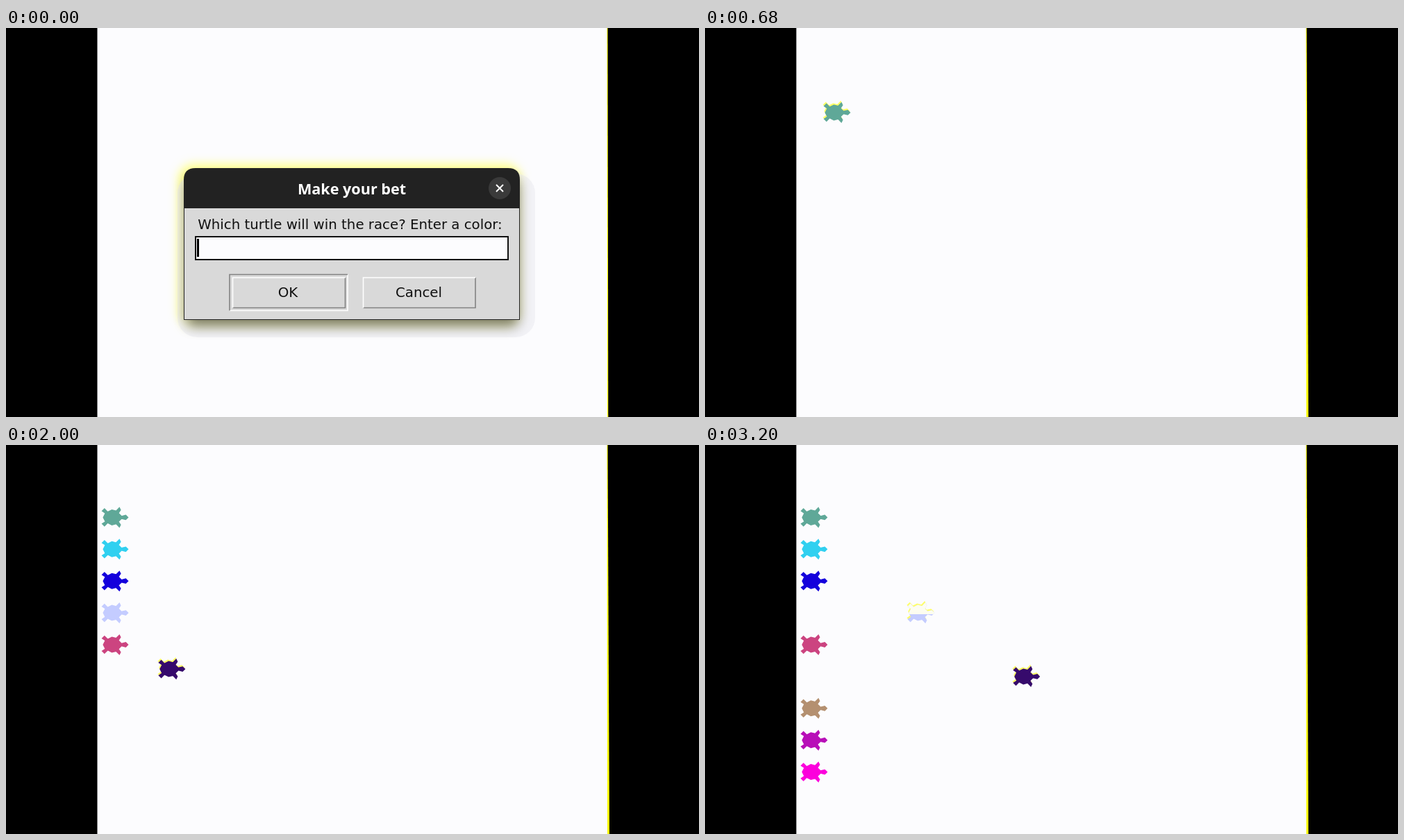
An HTML page that plays this animation: 998x561 px, repeating every 3360 ms.

```html
<!DOCTYPE html>
<html lang="en">
<head>
<meta charset="utf-8">
<title>Turtle race</title>
<style>
  html, body { margin: 0; width: 100%; height: 100%; overflow: hidden; background: #000; }
  svg { display: block; width: 998px; height: 561px; }
  text { font: 19.8px "DejaVu Sans", sans-serif; text-anchor: middle; fill: #111; }
  .title { font: bold 21.6px "Noto Sans", "Open Sans", sans-serif; fill: #fff; }
</style>
</head>
<body>
<svg id="stage" viewBox="0 0 998 561">
  <defs>
    <filter id="soft" x="-20%" y="-20%" width="140%" height="140%"><feGaussianBlur stdDeviation="7"/></filter>
    <filter id="softer" x="-20%" y="-20%" width="140%" height="140%"><feGaussianBlur stdDeviation="9"/></filter>
  </defs>
  <rect width="998" height="561"/>
  <rect x="131.5" width="734.5" height="561" fill="#fcfcfe"/>
  <path id="edge" fill="#ff0"/>
  <g id="turtles"></g>
  <g id="dialog">
    <rect x="248" y="196" width="494" height="236" rx="22" fill="#ffff8c" filter="url(#soft)"/>
    <rect x="247" y="210" width="515" height="236" rx="28" fill="#ececf0" opacity=".55"/>
    <rect x="260" y="218" width="478" height="212" rx="10" opacity=".5" filter="url(#softer)"/>
    <path d="M256 421V219q0-17 17-17H723q17 0 17 17V421Z" fill="#222"/>
    <rect x="257" y="260" width="482" height="160" fill="#d9d9d9"/>
    <text class="title" x="498" y="239.5">Make your bet</text>
    <circle cx="711" cy="231" r="16" fill="#3a3a3a"/>
    <path d="M706 226l10 10m0-10l-10 10" stroke="#fff" stroke-width="2"/>
    <text x="495.5" y="290">Which turtle will win the race? Enter a color:</text>
    <rect x="273" y="301" width="450" height="33" fill="#fcfcfe" stroke="#111" stroke-width="2"/>
    <rect id="caret" x="275" y="304" width="3" height="26"/>
    <g id="buttons"></g>
    <text x="406" y="388">OK</text>
    <text x="594.5" y="388">Cancel</text>
  </g>
</svg>
<script>
const LOOP = 3360, STEP = 40;
const ORIGIN = { x: 499, y: 288 }, HOME_X = 151, ROW_GAP = 45.9;
const COLORS = ['#5fa898', '#30d0f0', '#1400dc', '#c4ccff', '#cc4480',
                '#360a6c', '#b49070', '#b80eb8', '#fc00dc'];
// Highlight on the upper half while a turtle is away from its row start.
const HIGHLIGHTS = { 3: '#fdfdf0', 4: '#ff4284' };
// Race legs run one after another.
const RACE = [{ turtle: 5, length: 306 }, { turtle: 3, length: 154 }];
// Time and the total distance walked by all turtles so far.
const ODOMETER = [[412, 0], [680, 356], [1120, 909], [1640, 1597],
                  [2320, 2538], [2870, 3306], [3200, 3766]];

const $ = id => document.getElementById(id);
const clamp = (v, lo, hi) => Math.min(hi, Math.max(lo, v));

function add(parent, tag, attrs) {
  const node = document.createElementNS('http://www.w3.org/2000/svg', tag);
  for (const key in attrs) node.setAttribute(key, attrs[key]);
  parent.appendChild(node);
  return node;
}

function bevel(x, y, w, h, fill, light, dark) {
  const box = add($('buttons'), 'rect', { x, y, width: w, height: h, fill });
  const line = (d, stroke) => add($('buttons'), 'path', { d, stroke, fill: 'none', 'stroke-width': 1.6 });
  line(`M${x} ${y + h}h${w}v${-h}`, dark);
  line(`M${x} ${y + h}v${-h}h${w}`, light);
  return box;
}

bevel(322, 355.5, 170, 52, '#d9d9d9', '#828282', '#fff');
const okButton = bevel(326.5, 360, 162, 43.5, '#d9d9d9', '#fff', '#828282');
bevel(514.5, 360, 161.5, 43.5, '#d9d9d9', '#fff', '#828282');

// One side of the shell, from nose to tail, mirrored for the other side.
const half = [[16, 0], [14, 2], [10, 1], [7, 4], [9, 7], [8, 9], [5, 6], [1, 7],
              [-3, 5], [-6, 8], [-8, 6], [-5, 4], [-7, 0]];
const outline = [...half, ...half.slice(1, -1).reverse().map(([x, y]) => [x, -y])]
  .map(([x, y]) => `${x * 1.53},${y * 1.53}`).join(' ');

const turtles = COLORS.map((color, i) => {
  const group = add($('turtles'), 'g', {});
  const shape = (fill, extra) => add(group, 'polygon',
    { points: outline, fill, stroke: fill, 'stroke-width': 1.5, ...extra });
  const fringe = shape('#ffff66', { transform: 'translate(-1 -2)' });
  shape(color);
  let shine = null;
  if (HIGHLIGHTS[i]) {
    const clip = add($('stage').querySelector('defs'), 'clipPath', { id: `upper${i}` });
    add(clip, 'rect', { x: -20, y: -20, width: 50, height: 22 });
    shine = shape(HIGHLIGHTS[i], { 'clip-path': `url(#upper${i})` });
  }
  const y = ORIGIN.y + (i - 4) * ROW_GAP;
  return { group, fringe, shine, y, length: Math.hypot(ORIGIN.x - HOME_X, ORIGIN.y - y) };
});

function walked(t) {
  if (t <= ODOMETER[0][0]) return 0;
  for (let i = 1; i < ODOMETER.length; i++) {
    const [t0, d0] = ODOMETER[i - 1], [t1, d1] = ODOMETER[i];
    if (t <= t1) return d0 + (d1 - d0) * (t - t0) / (t1 - t0);
  }
  return ODOMETER[ODOMETER.length - 1][1];
}

const show = (node, on) => node.setAttribute('display', on ? 'inline' : 'none');

function render(t) {
  const closing = clamp((t - 360) / 120, 0, 1);
  show($('dialog'), closing < 1);
  $('dialog').setAttribute('opacity', 1 - closing);
  $('dialog').setAttribute('transform',
    `translate(498 311) scale(${1 - 0.2 * closing}) translate(-498 -311)`);
  show($('caret'), t < 160);
  okButton.setAttribute('fill', t < 160 ? '#d9d9d9' : '#ececec');
  $('edge').setAttribute('d', t < 400 ? 'M865.5 0h1l.8 561h-1.3Z' : 'M865.5 0h1l2.5 561h-3Z');

  let left = walked(t);
  for (const turtle of turtles) {
    const part = clamp(left / turtle.length, 0, 1);
    turtle.visible = left > 3;
    turtle.x = ORIGIN.x + (HOME_X - ORIGIN.x) * part;
    turtle.rowY = ORIGIN.y + (turtle.y - ORIGIN.y) * part;
    left -= turtle.length;
  }
  for (const leg of RACE) {
    turtles[leg.turtle].x += clamp(left, 0, leg.length);
    left -= leg.length;
  }
  for (const { group, fringe, shine, visible, x, rowY } of turtles) {
    const away = x > HOME_X + 1;
    show(group, visible);
    show(fringe, away);
    if (shine) show(shine, away);
    group.setAttribute('transform', `translate(${x} ${rowY})`);
  }
}

function tick(now) {
  const t = now % LOOP;
  render(Math.floor(t / STEP) * STEP);
  requestAnimationFrame(tick);
}
render(0);
requestAnimationFrame(tick);
</script>
</body>
</html>
```
